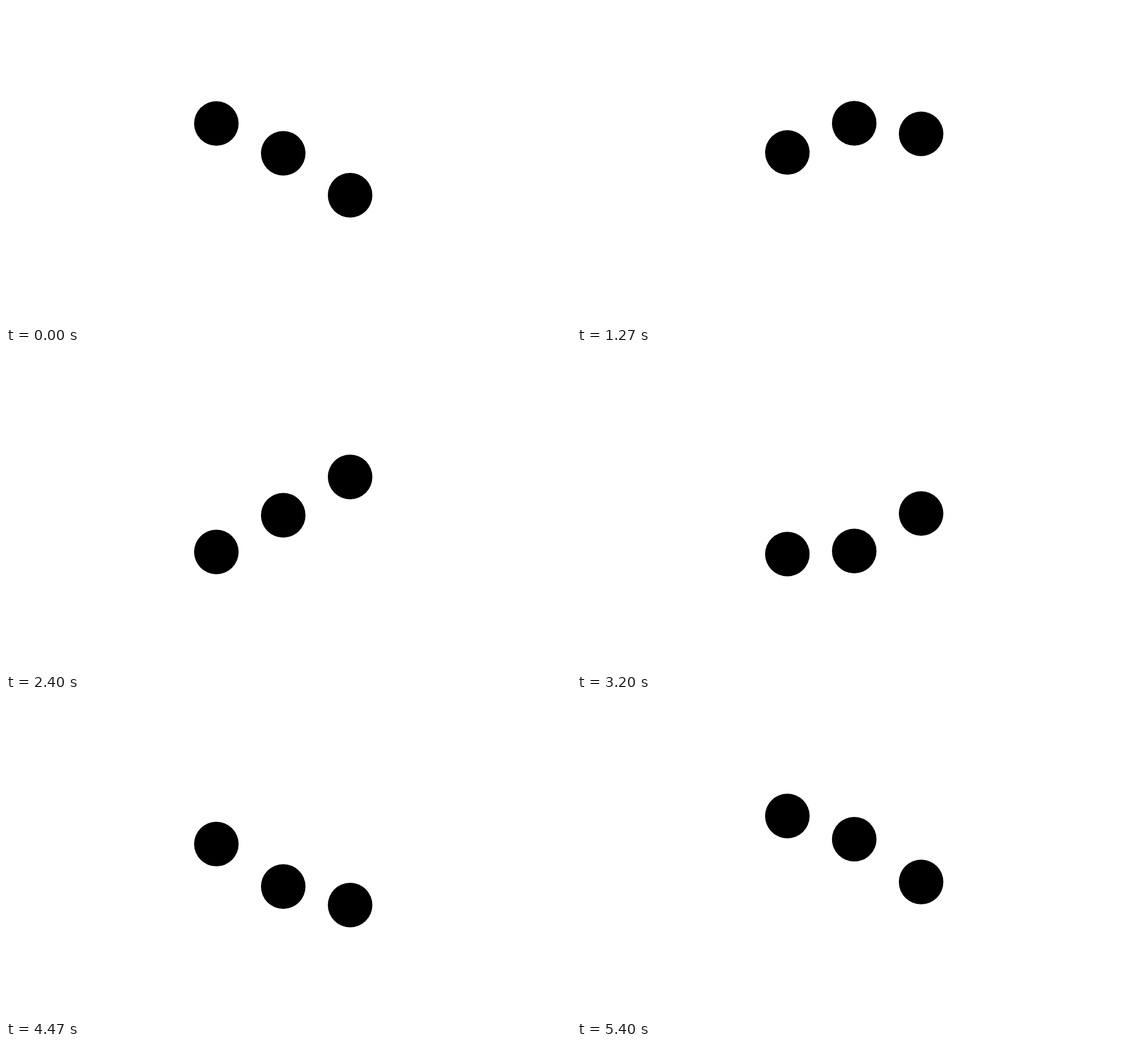
Write an HTML page that moves like this. It is 997x562 px and loops after 5.47 s.

```html
<!DOCTYPE html>
<html lang="en">
<head>
<meta charset="utf-8">
<title>Three bobbing dots</title>
<style>
  html, body { margin: 0; width: 100%; height: 100%; overflow: hidden; background: #fff; }
  svg { display: block; width: 997px; height: 562px; }
</style>
</head>
<body>
<svg viewBox="0 0 997 562">
  <circle cx="371.2" r="39.3"/>
  <circle cx="489.2" r="39.3"/>
  <circle cx="607.2" r="39.3"/>
</svg>
<script>
  const LOOP = 5470, FPS = 15;
  const MID = 282.8, SWING = 78.6, SPEED = 1.2, PHASE = 0.27;
  const dots = document.querySelectorAll('circle');

  function draw(now) {
    // Steps at 15 per second, switching on 10 ms boundaries
    const seconds = Math.floor((now % LOOP + 5) * FPS / 1000) / FPS;
    dots.forEach((dot, i) => {
      const y = MID - SWING * Math.cos(SPEED * seconds - PHASE - i);
      dot.setAttribute('cy', y.toFixed(2));
    });
  }

  function tick() {
    draw(performance.now());
    requestAnimationFrame(tick);
  }
  tick();
</script>
</body>
</html>
```
